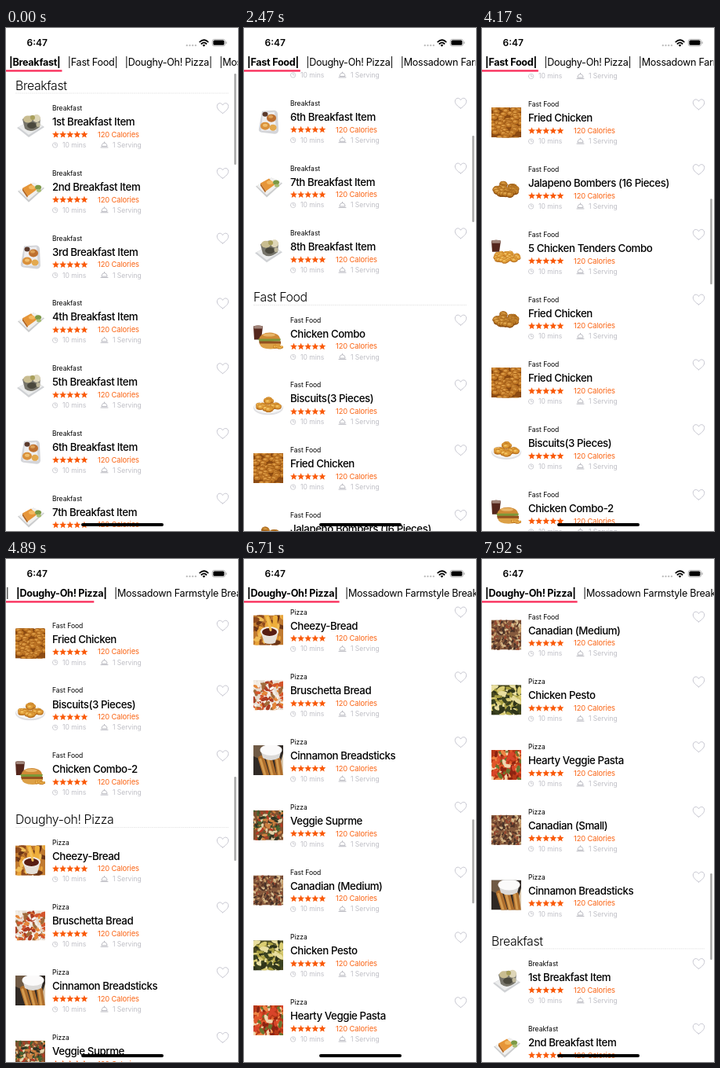
Write an HTML page that moves like this. It is 296 px wide and 640 px high and loops after 8 s.

```html
<!DOCTYPE html>
<html lang="en">
<head>
<meta charset="utf-8">
<title>Menu</title>
<style>
html, body { margin: 0; width: 100%; height: 100%; overflow: hidden; background: #fff; }
svg { display: block; font-family: Inter, "Noto Sans", sans-serif; }
.category { font-size: 8.5px; }
.title { font-size: 13.3px; font-weight: 500; letter-spacing: -.42px; }
.calories { font-size: 9.4px; letter-spacing: -.13px; fill: #fa6414; }
.info { font-size: 8.5px; fill: #bebec5; }
.header { font-size: 15.8px; font-weight: 300; letter-spacing: -.35px; }
.tab { font-size: 12.6px; letter-spacing: -.28px; }
.time { font-size: 12px; font-weight: 600; }
</style>
</head>
<body>
<svg id="stage" width="296" height="640" viewBox="0 0 296 640"></svg>
<script>
const PITCH = 82.76, SECTION_GAP = 27.6, LOOP = 8000;
const stage = document.getElementById('stage');

// Shape helpers
const oval = (x, y, rx, ry, fill) => `<ellipse cx="${x}" cy="${y}" rx="${rx}" ry="${ry}" fill="${fill}"/>`;
const path = (d, fill) => `<path d="${d}" fill="${fill}"/>`;
const line = (d, stroke, width) => `<path d="${d}" fill="none" stroke="${stroke}" stroke-width="${width}" stroke-linecap="round" stroke-linejoin="round"/>`;
const box = (x, y, w, h, fill, r = 0) => `<rect x="${x}" y="${y}" width="${w}" height="${h}" rx="${r}" fill="${fill}"/>`;
const text = (cls, x, y, s) => `<text class="${cls}" x="${x}" y="${y}">${s}</text>`;

function random(seed) {
  seed *= 7654321;
  return () => (seed = (seed * 16807) % 2147483647) / 2147483647;
}

// Square covered with irregular bits of food
function texture(seed, base, colors, count, size) {
  const rnd = random(seed);
  let out = box(0, 0, 38, 38, base);
  for (let i = 0; i < count; i++) {
    const x = rnd() * 38, y = rnd() * 38, r = size * (.5 + rnd());
    out += `<g transform="translate(${x} ${y}) rotate(${rnd() * 180})">${oval(0, 0, r, r * .5, colors[i % colors.length])}</g>`;
  }
  return out;
}

// Heap of round pieces inside an ellipse, each lit from above
function heap(seed, cx, cy, rx, ry, [dark, mid, light], count, size) {
  const rnd = random(seed);
  const pieces = Array.from({ length: count }, () => {
    const a = rnd() * 6.283, d = Math.sqrt(rnd());
    return [cx + rx * d * Math.cos(a), cy + ry * d * Math.sin(a)];
  }).sort((a, b) => a[1] - b[1]);
  return pieces.map(([x, y]) => oval(x, y, size * 1.3, size, dark) + oval(x, y - size * .2, size * 1.15, size * .75, mid) +
    oval(x - size * .2, y - size * .4, size * .6, size * .35, light)).join('');
}

const GOLD = ['#b8701f', '#e2a03a', '#f4c768'];
const BROWN = ['#8d4f12', '#c07f28', '#dda34c'];
const cola = bottom => path(`M0 4Q6 2 12 4L10 ${bottom}H1Z`, '#55271d') + path('M0 4Q6 2 12 4L11 7H1Z', '#a08479');

const thumbs = {
  bowl: path('M2 21L22 10L37 20L17 33Z', '#cfd1d4') + path('M4 20L22 11L35 19L17 30Z', '#eceded') +
    path('M9 10Q20 2 32 8L31 20Q20 29 12 22Z', '#76746a') + oval(16, 10, 6, 4.5, '#c9bd91') +
    oval(27, 9, 5, 5, '#ded6b8') + oval(22, 8, 3, 3, '#a9a05c') + oval(21, 18, 6, 4, '#4a483d') + oval(29, 17, 2.5, 3, '#bdb69a'),
  toast: path('M3 19L23 8L37 15L17 33Z', '#cbcccd') + path('M4 18L23 8L36 14L17 30Z', '#f0f0ef') +
    path('M9 15L20 9L27 17L16 25Z', '#e69538') + path('M9 15L16 25L15 27L9 18Z', '#b4651f') +
    oval(21, 14, 4, 2.5, '#f3b860') + oval(29, 14, 4, 3, '#7c9945') + oval(30, 18, 3, 2, '#a8bd72'),
  tray: path('M11 6L27 5Q31 6 31 10L32 31Q31 35 27 35L10 33Q6 32 7 28Z', '#d4d5d9') +
    path('M12 8L27 7L29 31L10 31Z', '#eeeef0') + oval(15, 10, 3.5, 3, '#5a3a2c') + oval(23, 15, 6, 5, '#bd7030') +
    oval(22, 13, 3, 2, '#dda057') + oval(15, 25, 6, 5, '#d9903b') + oval(25, 27, 4.5, 4, '#e3a94f') + oval(15, 24, 3, 2, '#f0c070'),
  combo: cola(21) + path('M7 21Q9 12 21 12Q34 13 34 21Z', '#cf8a36') + oval(20, 15, 8, 2, '#e8b568') +
    path('M6 20L35 20L34 23L8 24Z', '#7d9838') + path('M7 23H35V27H8Z', '#94511f') + path('M8 26H35Q34 33 22 33Q9 33 8 26Z', '#dca046') +
    heap(9, 31, 30, 6, 2, GOLD, 14, 1.6),
  biscuits: oval(19, 25, 19, 9, '#dfdfe2') + oval(19, 24, 18, 8, '#f6f6f5') + heap(4, 10, 23, 4, 2, GOLD, 10, 3.2) +
    heap(6, 28, 23, 4, 2, GOLD, 10, 3.2) + heap(7, 19, 16, 4, 2, GOLD, 10, 3.2) + heap(8, 19, 26, 4, 2, GOLD, 10, 3.2),
  fried: box(0, 0, 38, 38, '#8d4c14') + heap(31, 19, 20, 24, 24, ['#87470f', '#bf7625', '#dc9b45'], 90, 3.6),
  nuggets: heap(12, 19, 22, 14, 8, BROWN, 38, 3.7),
  tenders: cola(18) + heap(23, 19, 25, 15, 6, GOLD, 50, 2.7),
  cheesy: texture(5, '#c07a30', ['#e9a43a', '#8f4a1c', '#f0bd58', '#6b3517'], 45, 5) + line('M16 -2L24 20M28 3L27 16', '#eeae3a', 6) +
    path('M9 20H32L28 35Q21 38 14 35Z', '#e6e0d8') + oval(20.5, 21, 11.5, 6.5, '#f3eee8') + oval(20.5, 21.5, 9.5, 5, '#571d12') +
    line('M18 3L22 19', '#f5c158', 3),
  bruschetta: texture(8, '#e5dbcf', ['#d4552c', '#f4eee6', '#e5873a', '#faf7f2', '#ad3b22', '#a06a3a'], 120, 3.2),
  cinnamon: box(0, 0, 38, 38, '#2f2925') + path('M0 0H14V20L0 14Z', '#6f5a45') + path('M38 10V38H30Z', '#d8c6ab') +
    line('M10 17L17 40M20 18L26 40M31 19L34 40', '#ad6d2c', 8) + line('M9 18L15 38M19 19L24 38M30 19L33 38', '#d59c50', 3) +
    path('M9 5H36L33 16Q22 22 12 16Z', '#dcdad8') + oval(22.5, 6, 14, 7, '#fbfafa'),
  veggie: texture(17, '#80502f', ['#47622f', '#b73a24', '#e5d3aa', '#2f3524', '#cc8040'], 150, 2.6),
  canadian: texture(44, '#855a3e', ['#5a3526', '#c49a68', '#96472f', '#d8bf92', '#463128'], 180, 2),
  pesto: texture(61, '#4b4a20', ['#d9cc72', '#3a4220', '#a89f40', '#e9dfa0', '#2f3419'], 100, 4.2),
  pasta: texture(73, '#b63818', ['#e2562a', '#8c2412', '#ef8645', '#d8442a', '#69752f', '#f1d7b0'], 120, 3.4)
};

const breakfast = ['1st bowl', '2nd toast', '3rd tray', '4th toast', '5th bowl', '6th tray', '7th toast', '8th bowl']
  .map(s => s.split(' ')).map(([n, pic]) => [`${n} Breakfast Item`, pic]);
const sections = [
  ['Breakfast', 'Breakfast', breakfast],
  ['Fast Food', 'Fast Food', [['Chicken Combo', 'combo'], ['Biscuits(3 Pieces)', 'biscuits'], ['Fried Chicken', 'fried'],
    ['Jalapeno Bombers (16 Pieces)', 'nuggets'], ['5 Chicken Tenders Combo', 'tenders'], ['Fried Chicken', 'nuggets'],
    ['Fried Chicken', 'fried'], ['Biscuits(3 Pieces)', 'biscuits'], ['Chicken Combo-2', 'combo']]],
  ['Doughy-oh! Pizza', 'Pizza', [['Cheezy-Bread', 'cheesy'], ['Bruschetta Bread', 'bruschetta'], ['Cinnamon Breadsticks', 'cinnamon'],
    ['Veggie Suprme', 'veggie'], ['Canadian (Medium)', 'canadian', 'Fast Food'], ['Chicken Pesto', 'pesto'],
    ['Hearty Veggie Pasta', 'pasta'], ['Canadian (Small)', 'canadian'], ['Cinnamon Breadsticks', 'cinnamon']]],
  ['Breakfast', 'Breakfast', breakfast.slice(0, 3)]
];
const tabNames = ['Breakfast', 'Fast Food', 'Doughy-Oh! Pizza', 'Mossadown Farmstyle Breakfast'];

function star(cx, cy) {
  const points = Array.from({ length: 10 }, (_, i) => {
    const a = i * Math.PI / 5, r = i % 2 ? 2.1 : 4.7;
    return `${cx + r * Math.sin(a)},${cy - r * Math.cos(a)}`;
  });
  return `<polygon points="${points.join(' ')}" fill="#fa5a0a"/>`;
}

// Parts that every row shares; y = 0 is the middle of the category label
const rowParts = [0, 1, 2, 3, 4].map(i => star(63.5 + 9.1 * i, 33.8)).join('') +
  text('calories', 117, 36.9, '120 Calories') + text('info', 72, 50, '10 mins') + text('info', 136, 50, '1 Serving') +
  line('M59.4 47a3.2 3.2 0 1 0 6.4 0a3.2 3.2 0 1 0 -6.4 0M62.6 45V47H64.4', '#bebec5', .7) +
  line('M122 48.2Q122.3 44.4 125.5 44.3Q128.7 44.4 129 48.2ZM121 50H130M125.5 43V44', '#b4b4bc', .9) +
  line('M276.5 6.5C272 3.5 269.3 .8 269.3 -2.4C269.3 -6.8 274.6 -7.8 276.5 -3.9C278.4 -7.8 283.7 -6.8 283.7 -2.4C283.7 .8 281 3.5 276.5 6.5Z', '#c6c6d0', 1);

function buildList() {
  let y = 102, out = '';
  for (const [name, category, items] of sections) {
    out += text('header', 12, y - 23.2, name) +
      `<path d="M12 ${y - 19}H284" stroke="#dcdcdc" stroke-width=".6" stroke-dasharray="2 .6"/>`;
    for (const [title, pic, label = category] of items) {
      out += `<g transform="translate(0 ${y})"><use href="#${pic}" x="12" y="4" width="38" height="38"/>` +
        text('category', 59, 3.1, label) + text('title', 59, 22.2, title) + '<use href="#row"/></g>';
      y += PITCH;
    }
    y += SECTION_GAP;
  }
  return out;
}

const symbols = Object.entries(thumbs).map(([id, art]) => `<symbol id="${id}" viewBox="0 0 38 38">${art}</symbol>`).join('');
const statusBar = text('time', 26.5, 23.2, '6:47') +
  [0, 1, 2, 3].map(i => oval(230.8 + 3.7 * i, 22.2, 1.2, 1.1, '#bdbdbd')).join('') +
  line('M247.3 17.6Q252.5 12.9 257.7 17.6M249.4 20Q252.5 17.3 255.6 20', '#000', 1.8) + path('M252.5 23.8L250.6 21.8Q252.5 20.4 254.4 21.8Z', '#000') +
  '<rect x="263.2" y="14.4" width="16.4" height="8.6" rx="2.6" fill="none" stroke="#a5a5a5" stroke-width=".8"/>' +
  box(264.4, 15.6, 14, 6.2, '#000', 1.6) + box(280.4, 17.2, 1.2, 3, '#a5a5a5', .6);

stage.innerHTML = `<defs>${symbols}<g id="row">${rowParts}</g></defs>
  <g id="list">${buildList()}</g>
  <rect id="bar" x="291.2" width="2.5" rx="1.25" fill="#a6a6a6"/>
  ${box(0, 0, 296, 55.5, '#fff')}${statusBar}
  ${tabNames.map(n => text('tab', 0, 48, `|${n}|`)).join('')}
  <rect id="underline" x="0" y="53.3" height="2.3" fill="#f92a58"/>
  ${box(96, 630, 105, 4, '#000', 2)}`;

const list = document.getElementById('list');
const bar = document.getElementById('bar');
const underline = document.getElementById('underline');
const tabs = [...stage.querySelectorAll('.tab')];

const clamp = v => Math.min(1, Math.max(0, v));
const mix = (a, b, p) => a + (b - a) * p;

// Swipes: start ms, end ms, scroll offset reached
const swipes = [[720, 1060, 76], [1310, 2150, 375], [2150, 2680, 435], [3020, 3790, 729], [3830, 4170, 860],
  [4330, 5130, 1270.7], [5140, 5550, 1400], [6140, 6360, 1459.5], [6610, 7480, 1679.5], [7480, 7920, 1821.7]];

function scrollAt(t) {
  let y = 0;
  for (const [start, end, to] of swipes) y = mix(y, to, 1 - (1 - clamp((t - start) / (end - start))) ** 1.5);
  return y;
}

// Indicator: scroll offset, top, length
const barStops = [[0, 58, 116], [277, 110, 110], [420, 137, 110], [681, 186, 110], [1203, 277, 107], [1496, 331, 107], [1822, 400, 110]];

function drawBar(y, t) {
  const i = Math.max(1, barStops.findIndex(s => s[0] >= y));
  const a = barStops[i - 1], b = barStops[i], p = (y - a[0]) / (b[0] - a[0]);
  bar.setAttribute('y', mix(a[1], b[1], p));
  bar.setAttribute('height', mix(a[2], b[2], p));
  bar.setAttribute('opacity', t < 720 ? 1 - clamp((t - 300) / 260) : clamp((t - 720) / 100));
}

const tabStarts = [-1000, 2080, 4690];

function drawTabs(t) {
  const active = tabStarts.filter(s => t >= s).length - 1;
  const p = 1 - (1 - clamp((t - tabStarts[active]) / 310)) ** 2;
  tabs.forEach((tab, i) => tab.setAttribute('font-weight', i === active ? 700 : 400));
  const widths = tabs.map(tab => tab.getComputedTextLength());
  const lefts = widths.map((_, i) => widths.slice(0, i).reduce((sum, w) => sum + w + 9.4, 0));
  const from = Math.max(0, active - 1);
  const shift = mix(lefts[from], lefts[active], p);
  tabs.forEach((tab, i) => tab.setAttribute('x', 4 + lefts[i] - shift));
  underline.setAttribute('width', 6 + mix(widths[from], widths[active], p ** 1.5));
}

function frame(now) {
  const t = now % LOOP, y = scrollAt(t);
  list.setAttribute('transform', `translate(0 ${-y})`);
  drawBar(y, t);
  drawTabs(t);
  requestAnimationFrame(() => frame(performance.now() - begin));
}
const begin = performance.now();
frame(0);
</script>
</body>
</html>
```
